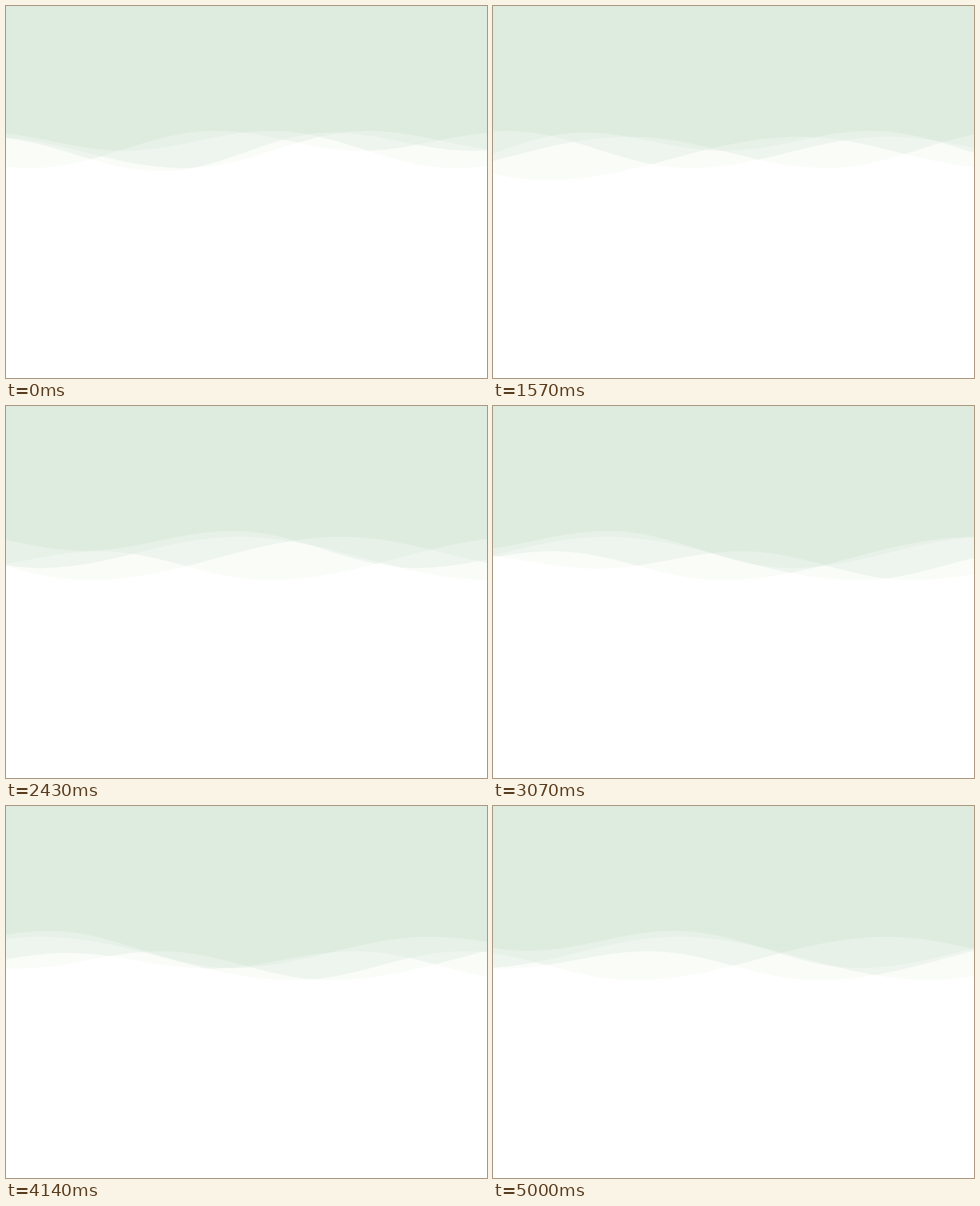
Animation of 851x658 px, one loop 5080 ms. Source, as an HTML page with a canvas:

```html
<!DOCTYPE html>
<html lang="en">
<head>
<meta charset="utf-8">
<title>Waves</title>
<style>
  html, body { margin: 0; width: 100%; height: 100%; overflow: hidden; background: #fff; }
  canvas { display: block; }
</style>
</head>
<body>
<canvas id="stage" width="851" height="658"></canvas>
<script>
const W = 851, H = 658, LOOP = 5080, STEP = 1000 / 14, TURN = 3840;
const ctx = document.getElementById('stage').getContext('2d');

// Key points: crests and troughs of the long profile that every wave shares.
const profile = [
  [-1120, 232], [-810, 292], [-510, 224], [-260, 256], [0, 221], [325, 286.5],
  [675, 231.5], [1125, 308], [1425, 257], [1680, 287.5], [1935, 260], [2200, 292]
];

// Start, travel and direction; waves that move right use the mirrored profile.
const waves = [
  { x: 470, travel: -947, dir: 1 },
  { x: 370, travel: 1160, dir: -1 },
  { x: 640, travel: 1225, dir: -1 },
  { x: 1085, travel: -882, dir: 1 }
];

// Shade by how many waves cover a point.
const sky = '#deecdf';
const shades = ['#e7f1e8', '#eef5ef', '#fafcf8', '#fff'];

// Triangle wave with rounded turns: steady drift out, then back.
function drift(ms) {
  const sharp = 0.971;
  const swing = Math.asin(sharp * Math.cos(Math.PI * ms / TURN));
  return (Math.asin(sharp) - swing) / 2.232;
}

function height(u) {
  const i = profile.findIndex(point => point[0] > u);
  const [u0, y0] = profile[i - 1], [u1, y1] = profile[i];
  return y0 + (y1 - y0) * (1 - Math.cos(Math.PI * (u - u0) / (u1 - u0))) / 2;
}

function draw(ms) {
  const p = drift(Math.floor((ms + 5) / STEP) * STEP);

  const columns = [];
  for (let x = 0; x <= W; x++) {
    columns.push(waves
      .map(w => height(w.dir * (x - w.x - w.travel * p)))
      .sort((a, b) => a - b));
  }

  ctx.fillStyle = sky;
  ctx.fillRect(0, 0, W, H);
  shades.forEach((shade, rank) => {
    ctx.beginPath();
    ctx.moveTo(0, H);
    columns.forEach((ys, x) => ctx.lineTo(x, ys[rank]));
    ctx.lineTo(W, H);
    ctx.fillStyle = shade;
    ctx.fill();
  });
}

const start = performance.now();
function loop() {
  draw((performance.now() - start) % LOOP);
  requestAnimationFrame(loop);
}
loop();
</script>
</body>
</html>
```
